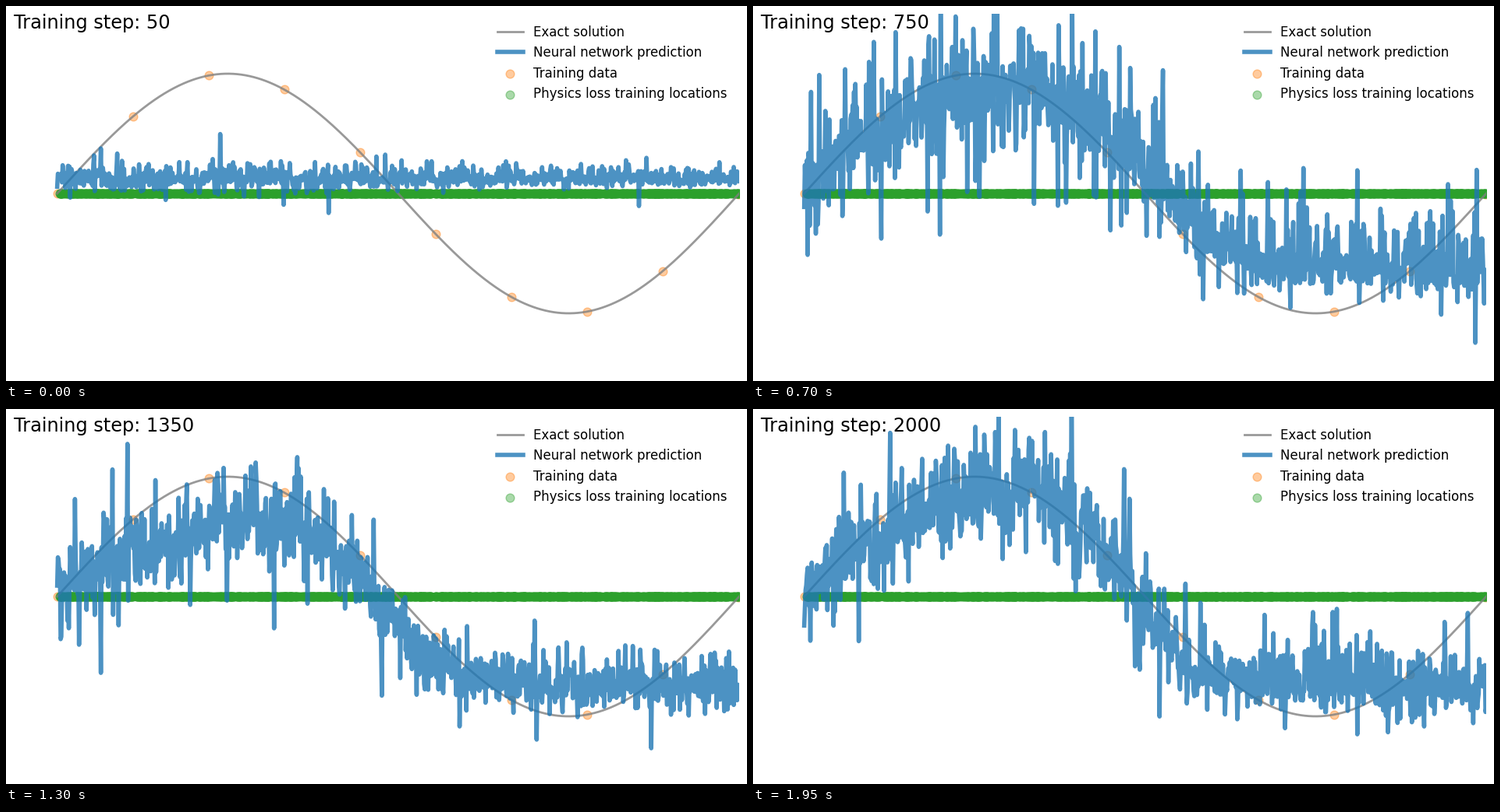
Animation of 950x482 px, one loop 2 s. Source, as a matplotlib script:

```python
import numpy as np
import matplotlib.pyplot as plt
from matplotlib.animation import FuncAnimation

FRAMES, INTERVAL = 40, 50
END = 2 * np.pi

plt.rcParams["font.family"] = "DejaVu Sans"

x = np.linspace(0, END, 1001)
x_data = x[::111]
x_physics = np.random.default_rng(3).uniform(0.02, END, 1500)


def mix(a, b, t):
    return a + (b - a) * t


def ramp(v, start, stop):
    return np.clip((v - start) / (stop - start), 0, 1)


def predict(i):
    fit = 1 - (1 - ramp(i, 0, 8)) ** 2     # flat line turns into a wave
    late = ramp(i, 8, 26)                  # the drop sharpens and moves left
    swell = (0.5 + 0.5 * np.cos(END * (i - 14) / 25)) ** 2

    hump = 0.08 + (0.56 + 0.3 * swell) * np.sin(0.75 * x)
    floor = mix(-0.57, -0.75, late)
    drop = 1 / (1 + np.exp((mix(3.5, 3.05, late) - x) / mix(0.45, 0.3, late)))
    centre = mix(0.12, mix(hump, floor, drop), fit)

    # Heavy-tailed noise, skewed upwards on the right half.
    right = ramp(x, 2.4, 3.9)
    left_scale = 0.2 - 0.04 * late + 0.04 * swell
    up = mix(left_scale, 0.17 - 0.04 * late + 0.06 * swell, right)
    down = mix(left_scale, 0.1, right)
    noise = np.random.default_rng(100 + i).standard_t(6, x.size)
    return centre + mix(0.28, 1, fit) * noise * np.where(noise > 0, up, down)


fig = plt.figure(figsize=(9.5, 4.82), dpi=100, facecolor="white")
ax = fig.add_axes([10 / 950, 10 / 482, 930 / 950, 462 / 482])
ax.set_xlim(-0.4, END)
ax.set_ylim(-1.5, 1.5)
ax.axis("off")

ax.plot(x, np.sin(x), color="grey", lw=2, alpha=0.8, label="Exact solution")
prediction, = ax.plot(x, predict(0), color="tab:blue", lw=4, alpha=0.8,
                      label="Neural network prediction")
ax.scatter(x_data, np.sin(x_data), s=60, color="tab:orange", alpha=0.4,
           label="Training data")
ax.scatter(x_physics, np.zeros_like(x_physics), s=60, color="tab:green", alpha=0.4,
           label="Physics loss training locations")
ax.legend(loc="upper right", frameon=False, fontsize="large")
caption = ax.text(-0.4, 1.377, "", fontsize="xx-large", color="k")


def update(i):
    prediction.set_ydata(predict(i))
    caption.set_text(f"Training step: {50 * (i + 1)}")
    return prediction, caption


anim = FuncAnimation(fig, update, frames=FRAMES, interval=INTERVAL,
                     repeat=True, repeat_delay=0)
plt.show()
```
